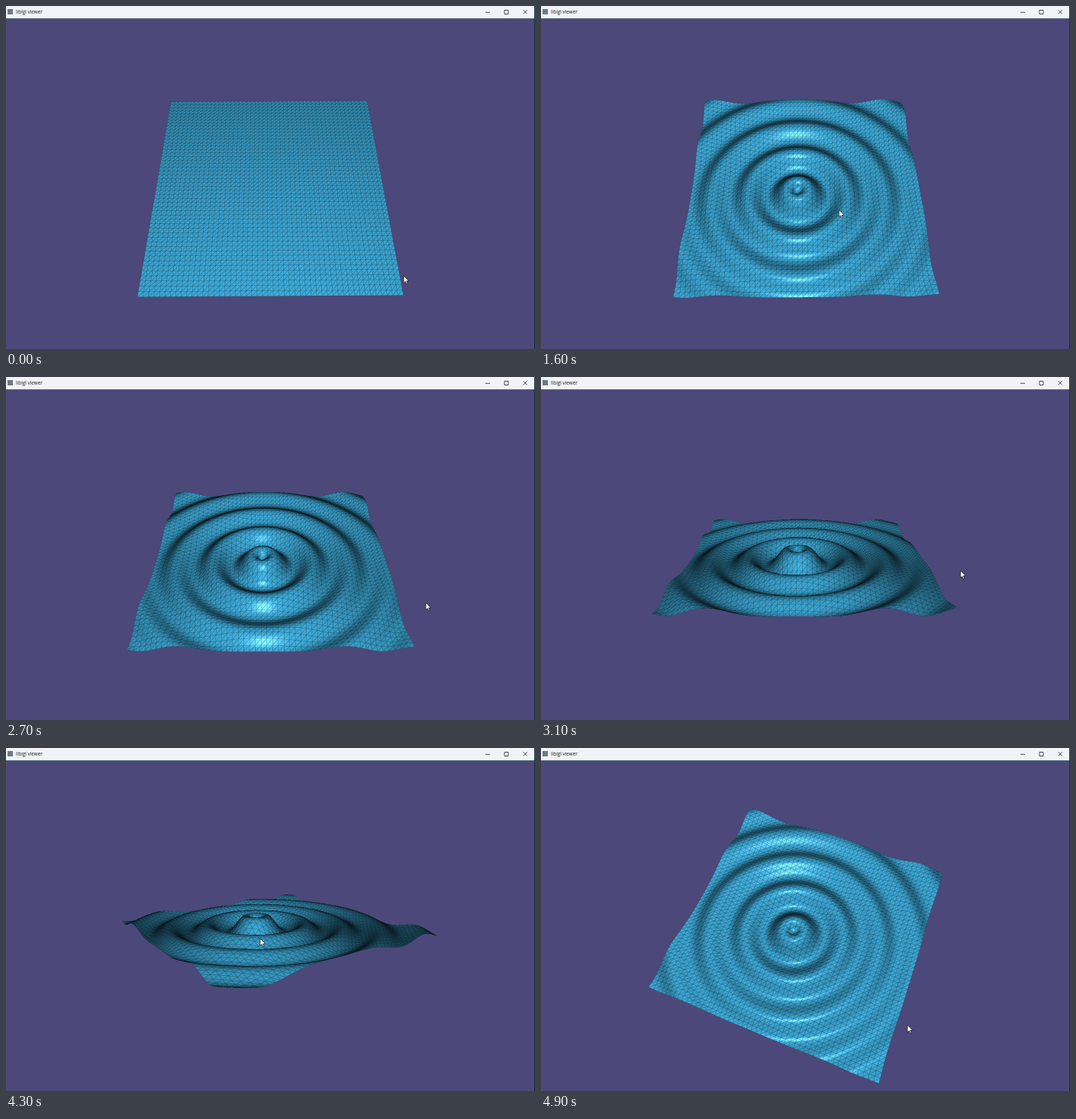
Write an HTML page with a canvas that moves like this. It is 693 by 450 pixels and loops after 5000 ms.

```html
<!DOCTYPE html>
<html lang="en">
<head>
<meta charset="utf-8">
<title>libigl viewer</title>
<style>
  html, body { margin: 0; width: 100%; height: 100%; overflow: hidden; background: #4c4879; }
  canvas { display: block; }
</style>
</head>
<body>
<canvas id="stage" width="693" height="450"></canvas>
<script>
const LOOP = 5000, STEP = 100, RIPPLE_AT = 1400;
const BAR = 17, VIEW_W = 691, VIEW_H = 433;
const SS = 2, W = VIEW_W * SS, H = VIEW_H * SS;       // supersampled view
const FOCAL = H / 2 / Math.tan(Math.PI / 8), EYE = 5;
const CELLS = 49, HALF = Math.SQRT2, CELL = 2 * HALF / CELLS;
const CENTER = [-1.5 * CELL, -2.5 * CELL], AMP = 0.25, FREQ = 13.9;
const DIFFUSE = [0.23, 0.63, 0.8];
const SPECULAR = DIFFUSE.map(c => 0.3 + 0.1 * (c - 0.3));
const LINE_ALPHA = 0.42;

// time, cursor x, cursor y, yaw, elevation (degrees)
const TRACK = [
  [0, 521, 354, 0.35, 57.6],
  [1150, 336.5, 242, 0.35, 57.6],
  [1400, 336.5, 242, 0.35, 57.6],
  [2200, 552, 344, 0.35, 57.6],
  [2300, 552, 344, 0.35, 57.6],
  [2700, 550, 296, 0, 41],
  [3500, 549, 212, 0, 3],
  [4100, 352, 222, -49, 6],
  [4300, 333, 250, -54.5, 15.2],
  [4900, 480, 363.5, -22, 65.8]
];

const stage = document.getElementById("stage").getContext("2d");
const view = document.createElement("canvas");
view.width = W;
view.height = H;
const viewCtx = view.getContext("2d");
const image = viewCtx.createImageData(W, H);
const nearest = new Float32Array(W * H);

function pose(t) {
  let i = 1;
  while (i < TRACK.length - 1 && TRACK[i][0] < t) i++;
  const a = TRACK[i - 1], b = TRACK[i];
  const p = Math.min(1, (t - a[0]) / (b[0] - a[0]));
  return a.map((v, j) => v + (b[j] - v) * p);
}

function bessel1(x) {
  const n = 40;
  let sum = 0;
  for (let i = 0; i < n; i++) {
    const a = (i + 0.5) * Math.PI / n;
    sum += Math.cos(a - x * Math.sin(a));
  }
  return sum / n;
}

const ripple = (x, y) => AMP * bessel1(FREQ * Math.hypot(x - CENTER[0], y - CENTER[1]));
const flat = () => 0;

// Vertices as [x, y, height, normal x, normal y, normal z]
function buildMesh(height) {
  const verts = [], e = 0.01;
  for (let j = 0; j <= CELLS; j++) {
    for (let i = 0; i <= CELLS; i++) {
      const x = i * CELL - HALF, y = j * CELL - HALF;
      const sx = (height(x + e, y) - height(x - e, y)) / (2 * e);
      const sy = (height(x, y + e) - height(x, y - e)) / (2 * e);
      const len = Math.hypot(sx, sy, 1);
      verts.push([x, y, height(x, y), -sx / len, -sy / len, 1 / len]);
    }
  }
  return verts;
}

const faces = [];
for (let j = 0; j < CELLS; j++) {
  for (let i = 0; i < CELLS; i++) {
    const a = j * (CELLS + 1) + i, c = a + CELLS + 1;
    faces.push([a, a + 1, c + 1], [a, c + 1, c]);
  }
}

const flatMesh = buildMesh(flat), rippleMesh = buildMesh(ripple);

function project(mesh, yaw, elev) {
  const cy = Math.cos(yaw), sy = Math.sin(yaw), ce = Math.cos(elev), se = Math.sin(elev);
  const turn = (x, y, z) => {
    const v = x * sy + y * cy;
    return [x * cy - y * sy, v * se + z * ce, z * se - v * ce];
  };
  return mesh.map(([x, y, h, nx, ny, nz]) => {
    const p = turn(x, y, h), n = turn(nx, ny, nz), depth = EYE - p[2];
    return {
      x: W / 2 + FOCAL * p[0] / depth,
      y: H / 2 - FOCAL * p[1] / depth,
      inv: 1 / depth, nx: n[0], ny: n[1], nz: n[2]
    };
  });
}

// Phong shading with a light just above the eye
function shade(at, px, py, depth, nx, ny, nz, ink) {
  const x = (px - W / 2) / FOCAL * depth, y = (H / 2 - py) / FOCAL * depth;
  const nl = Math.hypot(nx, ny, nz);
  nx /= nl; ny /= nl; nz /= nl;
  const ll = Math.hypot(x, 0.3 - y, depth), vl = Math.hypot(x, y, depth);
  const lx = -x / ll, ly = (0.3 - y) / ll, lz = depth / ll;
  const dot = Math.max(0, nx * lx + ny * ly + nz * lz);
  let gloss = 0;
  if (dot > 0) {
    const mirror = (-(2 * dot * nx - lx) * x - (2 * dot * ny - ly) * y + (2 * dot * nz - lz) * depth) / vl;
    gloss = Math.max(0, mirror) ** 35;
  }
  for (let c = 0; c < 3; c++) {
    image.data[at * 4 + c] = 255 * Math.min(1, DIFFUSE[c] * (0.1 + dot) + SPECULAR[c] * gloss) * ink;
  }
  image.data[at * 4 + 3] = 255;
}

function fillFace(a, b, c) {
  const area = (b.x - a.x) * (c.y - a.y) - (b.y - a.y) * (c.x - a.x);
  if (Math.abs(area) < 1e-6) return;
  const size = Math.abs(area);
  const ha = size / Math.hypot(c.x - b.x, c.y - b.y);
  const hb = size / Math.hypot(a.x - c.x, a.y - c.y);
  const hc = size / Math.hypot(b.x - a.x, b.y - a.y);
  const x0 = Math.max(0, Math.floor(Math.min(a.x, b.x, c.x)));
  const x1 = Math.min(W - 1, Math.ceil(Math.max(a.x, b.x, c.x)));
  const y0 = Math.max(0, Math.floor(Math.min(a.y, b.y, c.y)));
  const y1 = Math.min(H - 1, Math.ceil(Math.max(a.y, b.y, c.y)));
  for (let y = y0; y <= y1; y++) {
    for (let x = x0; x <= x1; x++) {
      const px = x + 0.5, py = y + 0.5;
      const wa = ((b.x - px) * (c.y - py) - (b.y - py) * (c.x - px)) / area;
      const wb = ((c.x - px) * (a.y - py) - (c.y - py) * (a.x - px)) / area;
      const wc = 1 - wa - wb;
      if (wa < 0 || wb < 0 || wc < 0) continue;
      const inv = wa * a.inv + wb * b.inv + wc * c.inv, at = y * W + x;
      if (inv <= nearest[at]) continue;
      nearest[at] = inv;
      const edge = Math.min(wa * ha, wb * hb, wc * hc);
      shade(at, px, py, 1 / inv,
        wa * a.nx + wb * b.nx + wc * c.nx,
        wa * a.ny + wb * b.ny + wc * c.ny,
        wa * a.nz + wb * b.nz + wc * c.nz,
        1 - LINE_ALPHA * Math.max(0, 1 - edge));
    }
  }
}

function drawMesh(mesh, yaw, elev) {
  image.data.fill(0);
  nearest.fill(0);
  const pts = project(mesh, yaw, elev);
  for (const [a, b, c] of faces) fillFace(pts[a], pts[b], pts[c]);
  viewCtx.putImageData(image, 0, 0);
  stage.drawImage(view, 0, BAR, VIEW_W, VIEW_H);
}

function rect(color, x, y, w, h) {
  stage.fillStyle = color;
  stage.fillRect(x, y, w, h);
}

function drawWindow() {
  rect("#f1f3f8", 0, 0, 693, 16);
  rect("#5a7a86", 0, 16, 693, 1);
  rect("#1b2b3c", 692, 0, 1, 450);
  rect("#6b7a85", 2, 4, 7, 7);
  stage.fillStyle = "#202020";
  stage.font = "6.4px 'Open Sans', sans-serif";
  stage.fillText("libigl viewer", 13, 10.3);
  stage.strokeStyle = "#222";
  stage.lineWidth = 0.8;
  stage.stroke(new Path2D("M628 8.3h6M653 5.5h5v5h-5zM677.7 5.3l5 5M682.7 5.3l-5 5"));
}

const arrow = new Path2D("M0 0V9.5L2.2 7.4 3.8 10.8 5.2 10.2 3.7 6.9 6.7 6.7Z");

function drawCursor(x, y) {
  stage.save();
  stage.translate(x, y);
  stage.fillStyle = "#fff";
  stage.strokeStyle = "#111";
  stage.lineWidth = 0.7;
  stage.fill(arrow);
  stage.stroke(arrow);
  stage.restore();
}

function draw(t) {
  const [, x, y, yaw, elev] = pose(t);
  const rad = Math.PI / 180;
  rect("#4c4879", 0, 0, 693, 450);
  drawMesh(t < RIPPLE_AT ? flatMesh : rippleMesh, yaw * rad, elev * rad);
  drawWindow();
  drawCursor(x, y);
}

let shown = -1;
function tick(now) {
  const step = Math.floor(now % LOOP / STEP);
  if (step !== shown) draw((shown = step) * STEP);
  requestAnimationFrame(tick);
}
requestAnimationFrame(tick);
</script>
</body>
</html>
```
